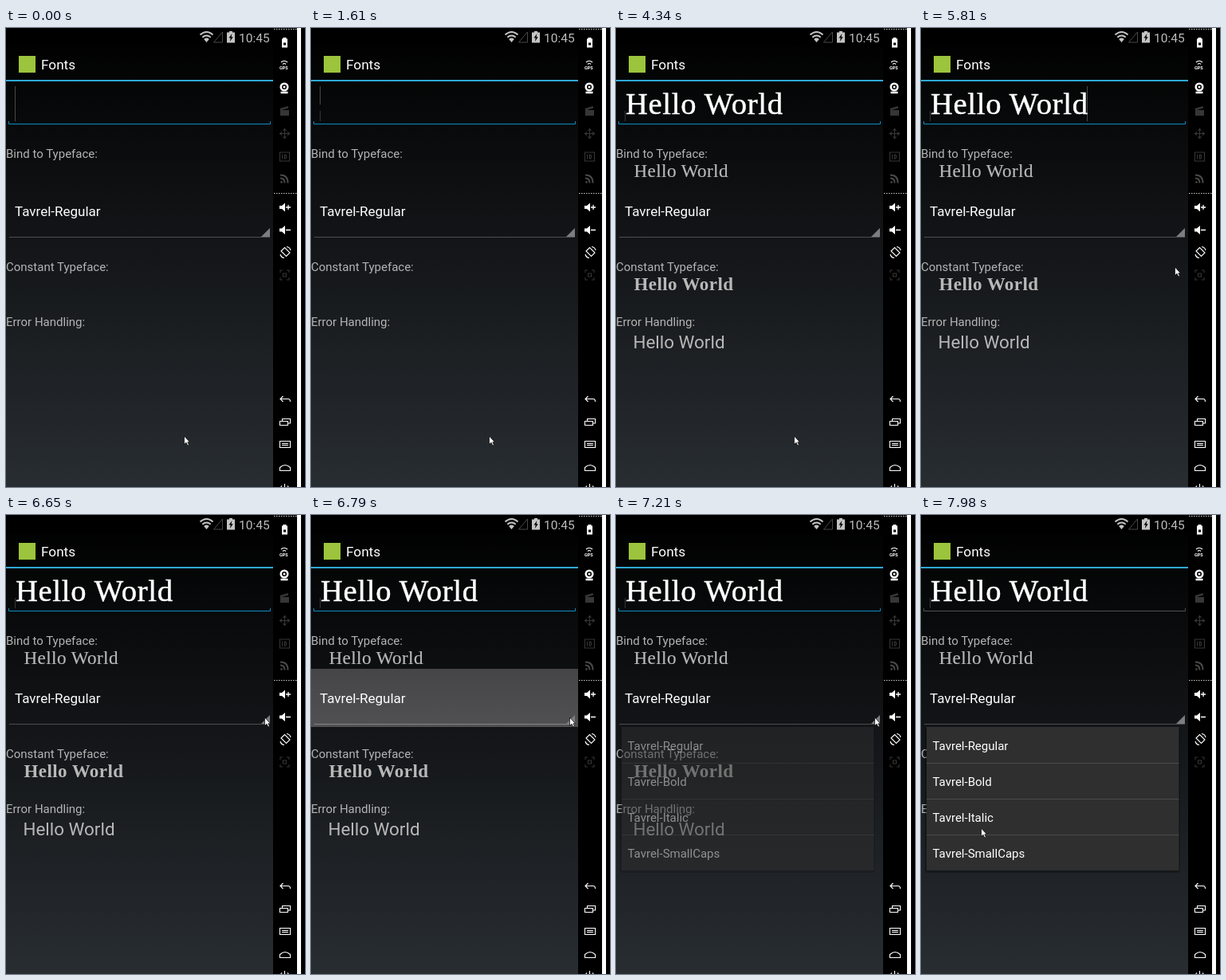
Write an HTML page that moves like this. It is 375 px wide and 576 px high and loops after 8000 ms.

```html
<!DOCTYPE html>
<html lang="en">
<head>
<meta charset="utf-8">
<title>Fonts demo</title>
<style>
html, body { margin: 0; height: 100%; overflow: hidden; background: #000; }
svg { display: block; width: 100vw; height: 100vh; }
text { font-family: Roboto, sans-serif; fill: #fff; white-space: pre; }
.label text { font-size: 15px; fill: #b4b4b4; }
.serif { font-family: "Liberation Serif", serif; letter-spacing: .018em; }
.typed { fill: #b8b8b8; }
.icon { fill: none; stroke: #fff; stroke-width: 1.1; }
.dim { stroke: #363636; }
.solid { fill: #fff; stroke: none; }
.dim.solid { fill: #363636; stroke: none; }
</style>
</head>
<body>
<svg viewBox="0 0 375 576">
  <defs>
    <linearGradient id="bg" x2="0" y2="1">
      <stop stop-color="#000"/><stop offset="1" stop-color="#282d32"/>
    </linearGradient>
    <linearGradient id="press" x2="0" y2="1">
      <stop stop-color="#454547"/><stop offset="1" stop-color="#515153"/>
    </linearGradient>
  </defs>

  <rect width="335" height="576" fill="url(#bg)"/>
  <rect width="335" height="24"/>

  <!-- status bar -->
  <g fill="none" stroke="#c4c4c4" stroke-width="2">
    <path d="M243.500 8.500Q251.500 1.500 259.500 8.500M246.300 11.700Q251.500 7.300 256.700 11.700"/>
  </g>
  <path d="M248.200 14Q251.500 11.200 254.800 14L251.500 18Z" fill="#c4c4c4"/>
  <path d="M260.500 18L271.500 5V18Z" fill="none" stroke="#484848"/>
  <path d="M277 5.500h3V4h4v1.500h3V18.500H277Z" fill="#c4c4c4"/>
  <path d="M283.500 7l-4 5.500h2.300l-1 4.500 4-5.800h-2.300z"/>
  <text x="292" y="17.500" font-size="15.500" style="fill:#bdbdbd">10:45</text>

  <!-- action bar -->
  <rect x="16" y="35" width="21" height="21" fill="#9cc43c"/>
  <text x="44" y="51.500" font-size="17.200">Fonts</text>
  <rect y="65" width="335" height="2" fill="#2fa8d5"/>

  <rect id="pressed" y="193" width="335" height="73" fill="url(#press)"/>
  <g class="label">
    <text x="0" y="162.500">Bind to Typeface:</text>
    <text x="0" y="304.500">Constant Typeface:</text>
    <text x="0" y="373.500">Error Handling:</text>
  </g>
  <path id="field" d="M3.500 117v3.500h328V117" fill="none"/>
  <path d="M11.500 104V117" stroke="#363636"/>
  <path id="caret" stroke="#484848"/>
  <text id="entry" class="input serif" x="12" y="108" font-size="38.600" stroke="#fff" stroke-width=".5"></text>
  <text class="input serif typed" x="22.500" y="187" font-size="23.100" stroke="#b8b8b8" stroke-width=".2"></text>
  <text class="input serif typed" x="22.500" y="329" font-size="23" font-weight="700"></text>
  <text class="input typed" x="21.500" y="401.500" font-size="22.400"></text>

  <!-- spinner -->
  <text x="11" y="235.500" font-size="17">Tavrel-Regular</text>
  <path id="line" d="M4 262.500H331" stroke="#4b4d4f"/>
  <path d="M331 251V262H320Z" fill="#7c7d7e"/>
  <g id="menu">
    <rect x="5" y="267" width="320" height="182" rx="3" opacity=".3"/>
    <rect x="7" y="266" width="316.500" height="180" fill="#2f2f2f"/>
    <path d="M7 311.500H323.500M7 356.500H323.500M7 401.500H323.500" stroke="#4b4b4b"/>
  </g>

  <!-- emulator toolbar -->
  <rect x="335" width="40" height="576"/>
  <rect x="365" width="5" height="576" fill="#fff"/>
  <path d="M336 1.500H365M336 207.500H365" stroke="#ccc" stroke-dasharray="1.500 1.500"/>
  <path class="icon solid" d="M347.500 12h4v1.500h1.500V24.500h-7V13.500h1.500z"/>
  <path d="M348 18.500h3v3h-3z"/>
  <g class="icon">
    <path d="M345 43q4-3.500 8 0M347 45.500q2-2 4 0"/>
    <circle cx="349" cy="74" r="4.300" stroke-width="2.500"/>
    <path d="M344.500 81h9" stroke-width="2.500"/>
    <path d="M354 222v6M351 225h6M351 253.500h6" stroke-width="1.300"/>
    <path d="M345 280l4.500-4.500 6.500 6.500-4.500 4.500zM344 284q1 4 5 4.500M357 279q-1-4-5-4.500"/>
    <path d="M347.500 462l-3.500 3.500 3.500 3.500M344 465.500h10q2.500 0 2.500 3.500"/>
    <path d="M343.500 493.500h10v5h-10zM346.500 493v-2.500h10v5.500h-2.500"/>
    <path d="M343.500 518.500h13v8h-13zM346 521.500h8M346 523.500h8"/>
    <path d="M343.500 555.500v-4q6.500-6 13 0v4z"/>
    <path d="M346 574.500q-3 3 0 6M353 574.500q3 3 0 6M349.500 572v6"/>
  </g>
  <circle cx="349" cy="74" r="1.500" fill="#fff"/>
  <text x="343" y="52" font-size="5.500" font-weight="700">GPS</text>
  <path class="icon solid" d="M343 223h3l4-3.500v11l-4-3.500h-3zM343 251.500h3l4-3.500v11l-4-3.500h-3z"/>
  <g class="icon dim">
    <path class="dim solid" d="M344 103h11v7h-11zM343.500 101l10-3 .8 2.500-10 3z"/>
    <path d="M349.500 127v11M344 132.500h11M347.500 129l2-2.500 2 2.500M347.500 136l2 2.500 2-2.500M346 130.500l-2.500 2 2.500 2M353 130.500l2.500 2-2.500 2"/>
    <path d="M343.500 156h12v11h-12zM346.500 158.500v6M349.500 159v5h1q2.500-2.500 0-5z"/>
    <path d="M344 184.500q9.500 0 9.500 10M344 188.500q5.500 0 5.500 6" stroke="#4a4a4a" stroke-width="2"/>
    <circle cx="345.500" cy="193.500" r="1.300" fill="#4a4a4a" stroke="none"/>
    <path d="M344 307v-3h3M352 304h3v3M355 313v3h-3M347 316h-3v-3M347.500 308h4v4h-4z"/>
  </g>

  <path id="pointer" d="M-.5 0V10.500L2 8.200 3.800 12 5.500 11.200 3.800 7.700H6.500Z" fill="#fff" stroke="#000" stroke-width=".7"/>
</svg>
<script>
const $ = id => document.getElementById(id);
const LOOP = 8000, TICK = 70;
const TEXT = "Hello World";
const keys = [3080, 3150, 3360, 3430, 3500, 3640, 3710, 3850, 3920];
const blinks = [350, 770, 1260, 1610, 2030, 2450, 2940, 3080,
                4340, 4620, 5040, 5530, 5950, 6440, 6650];
// time, x, y of the pointer tip
const route = [[0, 224, 512], [5110, 224, 512], [5250, 237, 478], [5460, 292, 360],
  [5670, 321, 299], [5810, 319, 300], [5950, 332, 290], [6300, 331, 268],
  [6650, 325, 254], [7490, 325, 254], [7630, 275, 300], [7770, 165, 392],
  [7840, 115, 427], [7910, 88, 416], [7980, 76, 393]];

["Regular", "Bold", "Italic", "SmallCaps"].forEach((style, i) => {
  const item = document.createElementNS("http://www.w3.org/2000/svg", "text");
  item.setAttribute("x", 14.5);
  item.setAttribute("y", 294.5 + i * 45.2);
  item.setAttribute("font-size", 15);
  item.textContent = "Tavrel-" + style;
  $("menu").append(item);
});

const passed = (times, t) => times.filter(k => k <= t).length;
const show = (id, alpha) => $(id).setAttribute("opacity", +alpha);

function pointerAt(t) {
  const i = Math.max(1, route.findIndex(p => p[0] >= t));
  const [t0, x0, y0] = route[i - 1], [t1, x1, y1] = route[i];
  const k = (t - t0) / (t1 - t0);
  return [x0 + (x1 - x0) * k, y0 + (y1 - y0) * k];
}

function draw(t) {
  const typed = passed(keys, t);
  const text = typed ? TEXT.slice(0, typed + 2) : "";
  document.querySelectorAll(".input").forEach(e => e.textContent = text);

  const x = text ? Math.round(12 + $("entry").getComputedTextLength()) - 1.5 : 11.5;
  const bottom = text || t < 350 ? 117 : 96;
  $("caret").setAttribute("d", `M${x} 73V${bottom}`);
  show("caret", passed(blinks, t) % 2 === 0);

  const pressed = t >= 6790 && t < 7070;
  show("pressed", pressed);
  $("line").setAttribute("stroke", pressed ? "#858585" : "#4b4d4f");
  $("field").setAttribute("stroke", t < 7560 ? "#108cc0" : "#505254");
  show("menu", t < 7210 ? 0 : t < 7280 ? .5 : 1);
  $("pointer").setAttribute("transform", `translate(${pointerAt(t)})`);
}

function frame() {
  const t = performance.now() % LOOP;
  draw(Math.floor(t / TICK) * TICK);
  requestAnimationFrame(frame);
}
frame();
</script>
</body>
</html>
```
